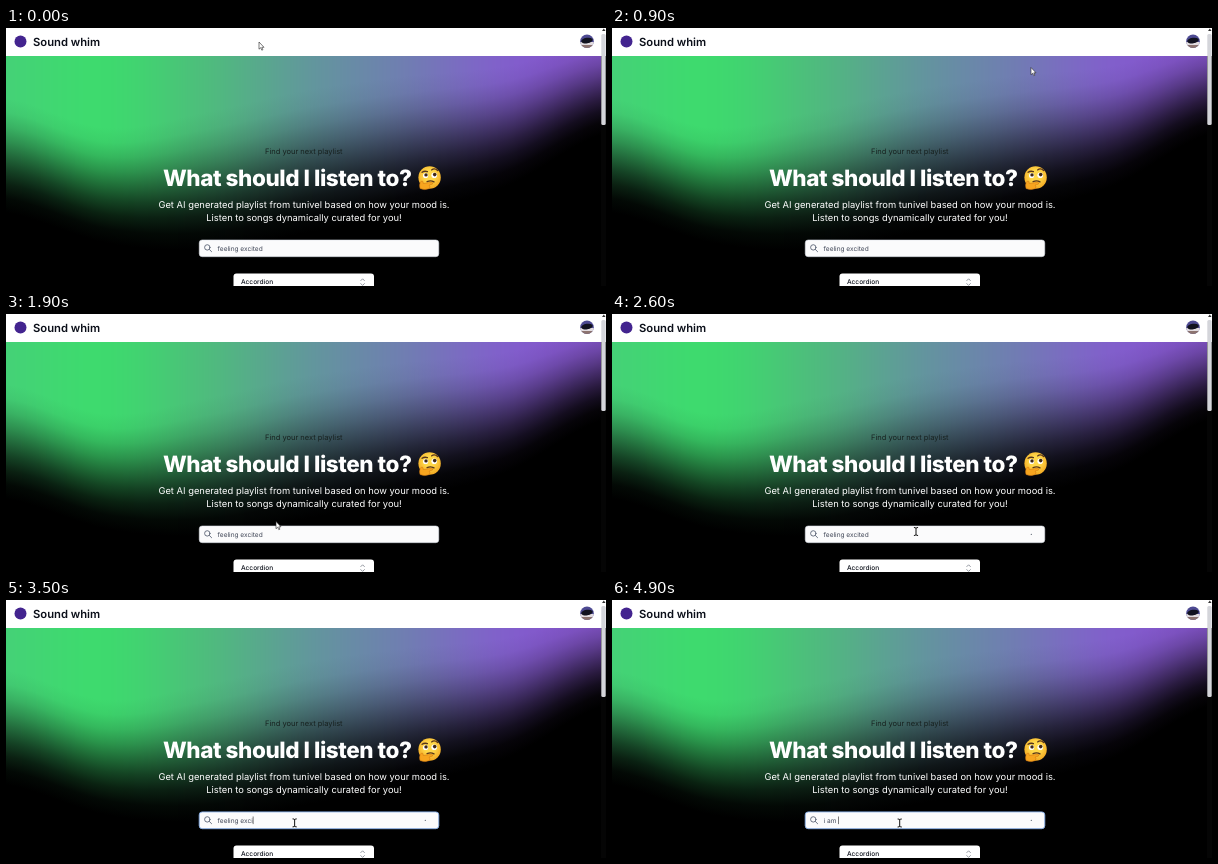
Write an HTML page with a canvas that moves like this. It is 600 by 258 pixels and loops after 5000 ms.

```html
<!DOCTYPE html>
<html lang="en">
<head>
<meta charset="utf-8">
<title>Sound whim</title>
<style>
  html, body { margin: 0; width: 100%; height: 100%; overflow: hidden; background: #000; }
  canvas, svg { position: absolute; left: 0; top: 0; width: 100%; height: 100%; }
  text { font-family: Inter, sans-serif; font-optical-sizing: none; text-rendering: geometricPrecision; white-space: pre; }
  .mid { text-anchor: middle; }
  .lead { font-size: 9.375px; fill: #fff; }
  .small { font-size: 6.56px; }
  .line { fill: none; stroke-linecap: round; stroke-linejoin: round; }
</style>
</head>
<body>
<canvas id="glow" width="600" height="258"></canvas>
<svg viewBox="0 0 600 258" preserveAspectRatio="none">
  <defs>
    <clipPath id="round"><circle cx="581" cy="13.3" r="6.8"/></clipPath>
    <radialGradient id="skin" cx=".5" cy=".4" r=".6">
      <stop offset=".4" stop-color="#ffd84a"/><stop offset="1" stop-color="#f3a822"/>
    </radialGradient>
  </defs>

  <!-- header -->
  <rect width="600" height="28" fill="#fff"/>
  <circle cx="14.5" cy="13.5" r="6" fill="#43248f"/>
  <text x="27" y="18" font-size="11.25" font-weight="600" fill="#0b0f19">Sound whim</text>
  <g clip-path="url(#round)">
    <rect x="574" y="6" width="14" height="15" fill="#4d4a92"/>
    <rect x="574" y="14" width="14" height="3" fill="#e2dce0"/>
    <rect x="574" y="17" width="14" height="4" fill="#8d7470"/>
    <ellipse cx="581" cy="12.6" rx="5.8" ry="2.8" fill="#11121f" transform="rotate(-10 581 12.6)"/>
  </g>

  <!-- scrollbar -->
  <rect x="595" y="28" width="5" height="230" fill="#050505"/>
  <path d="M596 3L597.8 .5L599.6 3Z" fill="#333"/>
  <rect x="595.3" y="6" width="4.4" height="91" rx="1.5" fill="#d4d5da"/>

  <!-- hero -->
  <text class="mid" x="297.8" y="126.2" font-size="7.5" fill="#17211f">Find your next playlist</text>
  <text x="157" y="158" font-size="22.5" font-weight="800" letter-spacing="-.45" fill="#fff">What should I listen to?</text>
  <g transform="translate(423.6 149.5)">
    <circle r="11.2" fill="url(#skin)"/>
    <g class="line" stroke="#57351b" stroke-width="1.3">
      <path d="M-7.5 -5.2Q-5 -7 -2.2 -5.8M2 -7.6Q5 -9.8 8 -7M-2.5 4.2Q1 2.6 4.4 4.4"/>
    </g>
    <g fill="#fff"><circle cx="-4" cy="-2" r="2.6"/><circle cx="4.6" cy="-2.2" r="2.8"/></g>
    <g fill="#3f2717"><circle cx="-3.6" cy="-2.6" r="1.7"/><circle cx="5.1" cy="-2.9" r="1.8"/></g>
    <path d="M-9.5 11Q-11 6 -8 3.5Q-6.4 3 -6.3 6L2 4.8Q4 5 2.8 6.6L-.5 7.5Q1.6 9.5 -1 11.3Q-5 13 -9.5 11Z" fill="#f7a51f" stroke="#d67b13" stroke-width=".6"/>
  </g>
  <text class="mid lead" x="298" y="180.3">Get AI generated playlist from tunivel based on how your mood is.</text>
  <text class="mid lead" x="298" y="193.4">Listen to songs dynamically curated for you!</text>

  <!-- search field -->
  <rect id="field" x="193.2" y="211.9" width="239.6" height="16.8" rx="3" fill="#fbfbfc"/>
  <g class="line" stroke="#5b6475" stroke-width=".9">
    <circle cx="201.3" cy="219.4" r="2.7"/><path d="M203.4 221.5L205.6 223.7"/>
  </g>
  <text id="hint" class="small" x="211.6" y="222.6" fill="#8a92a3">Enter your current mode, joyful, sad...</text>
  <text id="typed" class="small" x="211.6" y="222.6" fill="#404757"></text>
  <rect id="caret" y="216.5" width=".6" height="7.6" fill="#222"/>
  <circle id="dot" cx="419.3" cy="220.3" r=".6" fill="#4b5563"/>

  <!-- select -->
  <rect x="227.5" y="245.6" width="140.5" height="17" rx="3" fill="#fff"/>
  <text class="small" x="235" y="256.4" font-weight="500" fill="#0b0f19">Accordion</text>
  <path class="line" d="M354.8 252.6L356.6 250.8L358.4 252.6M354.8 255.6L356.6 257.4L358.4 255.6" stroke="#666c78" stroke-width=".7"/>

  <!-- pointers, both hot at 0,0 -->
  <path id="arrow" d="M0 0V7.2L1.7 5.7L2.8 8.2L3.9 7.7L2.8 5.3H5Z" fill="#fff" stroke="#222" stroke-width=".6"/>
  <path id="beam" class="line" d="M-1.7 -4Q0 -4 0 -3.2Q0 -4 1.7 -4M0 -3.2V3.2M-1.7 4Q0 4 0 3.2Q0 4 1.7 4" stroke="#111" stroke-width="1"/>
</svg>

<script>
const el = id => document.getElementById(id);
const clamp = (v, lo, hi) => Math.min(hi, Math.max(lo, v));
const smooth = k => k * k * (3 - 2 * k);

// every 100 px: red, green, blue, fade start, fade end
const hues = [
  [68, 210, 118, 70, 185],
  [62, 217, 110, 100, 215],
  [78, 188, 125, 84, 222],
  [97, 152, 155, 62, 205],
  [112, 125, 178, 48, 185],
  [129, 95, 203, 38, 158],
  [128, 82, 196, 12, 105]
];

// Catmull-Rom curve through evenly spaced rows
function curve(rows, at) {
  const i = Math.floor(at), k = at - i;
  const [a, b, c, d] = [-1, 0, 1, 2].map(n => rows[clamp(i + n, 0, rows.length - 1)]);
  return b.map((v, n) => v + k / 2 * (c[n] - a[n]
    + k * (2 * a[n] - 5 * v + 4 * c[n] - d[n] + k * (3 * (v - c[n]) + d[n] - a[n]))));
}

function paintGlow() {
  const ctx = el('glow').getContext('2d');
  for (let x = 0; x < 600; x++) {
    const [r, g, b, from, to] = curve(hues, x / 100);
    const fade = ctx.createLinearGradient(0, from, 0, to);
    for (let k = 0; k <= 1; k += .125) {
      const light = 1 - smooth(k);
      fade.addColorStop(k, `rgb(${[r, g, b].map(v => v * light).join()})`);
    }
    ctx.fillStyle = fade;
    ctx.fillRect(x, 28, 1, 230);
  }
}

// time, pointer x, pointer y
const path = [
  [0, 253, 14], [900, 419, 39.5], [1900, 270, 207.5], [2600, 304, 217.5],
  [3100, 289.3, 222.8], [4000, 287.7, 223], [5000, 287.7, 223]
];

function pointer(t) {
  const i = path.findIndex(p => p[0] > t);
  const [t0, x0, y0] = path[i - 1], [t1, x1, y1] = path[i];
  const k = smooth((t - t0) / (t1 - t0));
  return [x0 + (x1 - x0) * k, y0 + (y1 - y0) * k];
}

function entry(t) {
  const old = 'feeling excited', fresh = 'i am ';
  if (t < 4400) return old.slice(0, Math.round(old.length * (1 - clamp((t - 3400) / 500, 0, 1))));
  return fresh.slice(0, 1 + Math.floor((t - 4400) / 100));
}

const show = (id, on) => el(id).style.display = on ? '' : 'none';

function draw(now) {
  const t = Math.floor(now % 5000 / 100) * 100;
  const [x, y] = pointer(t);
  const inside = y > 211.8, focus = t >= 3300, text = entry(t);
  for (const id of ['arrow', 'beam']) el(id).setAttribute('transform', `translate(${x} ${y})`);
  show('arrow', !inside);
  show('beam', inside);
  show('hint', !text);
  show('caret', focus);
  show('dot', inside && text);
  el('typed').textContent = text;
  el('caret').setAttribute('x', 211.6 + (text ? el('typed').getComputedTextLength() : 0));
  el('field').setAttribute('stroke', focus ? '#86aee8' : '#cfd4de');
  el('field').setAttribute('stroke-width', focus ? .9 : .5);
}

paintGlow();
const start = performance.now();
requestAnimationFrame(function tick(now) {
  draw(Math.max(0, now - start));
  requestAnimationFrame(tick);
});
</script>
</body>
</html>
```
